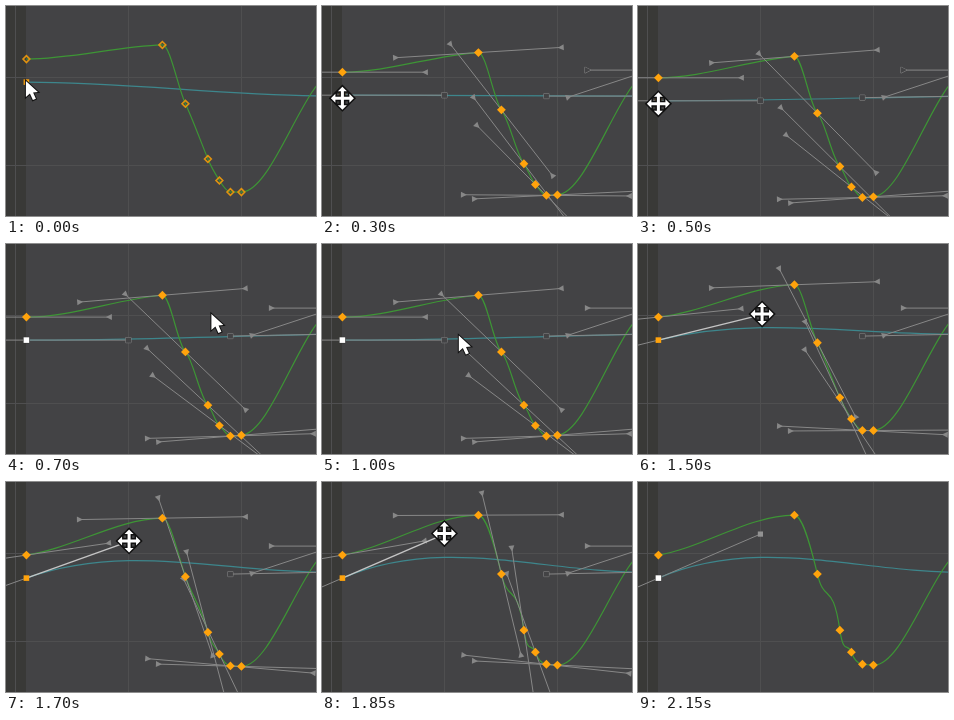
An HTML page with a canvas that plays this animation: 310 px wide and 210 px high, repeating every 2.3 s.

```html
<!DOCTYPE html>
<html lang="en">
<head>
<meta charset="utf-8">
<title>Curve editor</title>
<style>
html, body { margin: 0; width: 100%; height: 100%; overflow: hidden; background: #434345; }
canvas { display: block; }
</style>
</head>
<body>
<canvas id="stage" width="310" height="210"></canvas>
<script>
const ctx = document.getElementById('stage').getContext('2d');
const LOOP = 2300, STEP = 50, ARM = 83, RAD = Math.PI / 180;
const BACK = '#434345', GREEN = '#3d9535', TEAL = '#3d868c', GREY = '#878787';
const ORANGE = '#ffa30c', DIM_ORANGE = '#e0920f';

// green keys: offset from the teal curve, handle angle at rest and its gain with the lift
const KEYS = [
  { x: 20, off: -23, rest: 0, gain: 0 },
  { x: 156, off: -43, rest: -4.8, gain: 4.5 },
  { x: 179, off: 14.2, rest: 43, gain: 33 },
  { x: 201.5, off: 68, rest: 42, gain: 39 },
  { x: 213, off: 88.7, rest: 36, gain: 33.5 },
  { x: 224, off: 99.5, rest: -1.8, gain: 8 },
  { x: 235, off: 99, rest: -4.8, gain: 7.5 }
];
const LAST = { x: 328, y: 64, slope: -27 / 82 };

const mix = (a, b, u) => a + (b - a) * u;
const span = (t, from, to) => Math.min(1, Math.max(0, (t - from) / (to - from)));
const easeOut = u => u * (1.25 - 0.25 * u);

function line(x1, y1, x2, y2, color = GREY, width = 1) {
  ctx.strokeStyle = color;
  ctx.lineWidth = width;
  ctx.beginPath();
  ctx.moveTo(x1, y1);
  ctx.lineTo(x2, y2);
  ctx.stroke();
}

function shape(points, fill, stroke, width = 1) {
  ctx.beginPath();
  points.forEach(p => ctx.lineTo(p[0], p[1]));
  ctx.closePath();
  if (stroke) {
    ctx.strokeStyle = stroke;
    ctx.lineWidth = width;
    ctx.stroke();
  }
  if (fill) {
    ctx.fillStyle = fill;
    ctx.fill();
  }
}

function diamond(x, y, filled) {
  const r = filled ? 4.4 : 3.4;
  shape([[x - r, y], [x, y - r], [x + r, y], [x, y + r]],
    filled && ORANGE, !filled && DIM_ORANGE, 1.6);
}

function square(x, y, r, fill, stroke) {
  shape([[x - r, y - r], [x + r, y - r], [x + r, y + r], [x - r, y + r]], fill, stroke);
}

function arrowhead(x, y, angle, hollow) {
  ctx.save();
  ctx.translate(x, y);
  ctx.rotate(angle);
  shape([[3.5, 0], [-2.5, -3], [-2.5, 3]], hollow ? BACK : GREY, hollow && GREY);
  ctx.restore();
}

function curve(x1, y1, hx1, hy1, hx2, hy2, x2, y2, color) {
  ctx.strokeStyle = color;
  ctx.lineWidth = 1.2;
  ctx.beginPath();
  ctx.moveTo(x1, y1);
  ctx.bezierCurveTo(hx1, hy1, hx2, hy2, x2, y2);
  ctx.stroke();
}

function segment(a, b) {
  const d = (b.x - a.x) / 3;
  curve(a.x, a.y, a.x + d, a.y + d * a.slope, b.x - d, b.y - d * b.slope, b.x, b.y, GREEN);
}

function background() {
  ctx.fillStyle = BACK;
  ctx.fillRect(0, 0, 310, 210);
  ctx.fillStyle = '#393937';
  ctx.fillRect(0, 0, 20, 210);
  ctx.fillStyle = '#4f4f50';
  [9, 122, 235].forEach(x => ctx.fillRect(x, 0, 1, 210));
  [71, 159].forEach(y => ctx.fillRect(0, y, 310, 1));
}

function pointer(x, y) {
  const pts = [[0, 0], [0, 16], [4, 12.5], [7, 19], [10, 17.7], [7.2, 11.5], [12, 11]];
  shape(pts.map(p => [x + p[0], y + p[1]]), '#fff', '#111', 2);
}

function moveCursor(x, y) {
  const arm = [[-1.5, -1.5], [-1.5, -7], [-4.5, -7], [0, -11.5], [4.5, -7], [1.5, -7]];
  const pts = [];
  for (let i = 0; i < 4; i++) {
    const c = Math.cos(i * 90 * RAD), s = Math.sin(i * 90 * RAD);
    arm.forEach(p => pts.push([x + p[0] * c - p[1] * s, y + p[0] * s + p[1] * c]));
  }
  shape(pts, '#fff', '#111', 3);
}

function draw(t) {
  const open = t >= 50 && t < 2150;
  const bent = t >= 1150;

  // the key is dragged down, then its handle up
  const y0 = mix(76, 96, span(t, 0, 550) ** 0.7);
  const pull = easeOut(span(t, 1125, 1850));
  const hx = bent ? mix(126, 122, pull) : 122;
  const hy = y0 - 44 * pull;
  const farY = 90 + Math.max(0, (y0 - 90) / 3);

  const teal = x => {
    const u = (x - 20) / 306, v = 1 - u;
    return y0 * v ** 3 + 3 * hy * v * v * u + 3 * farY * v * u * u + 90 * u ** 3;
  };
  const lift = (94 - teal(179)) / 16;
  const tilt = 0.42 * Math.atan2(hy - y0, hx - 20);
  const keys = KEYS.map(({ x, off, rest, gain }, i) => {
    const angle = i ? (rest + gain * lift) * RAD : tilt;
    return { x, y: teal(x) + off, angle, slope: Math.tan(angle) };
  });

  background();
  ctx.save();
  ctx.translate(0.4, 0.1);

  curve(20, y0, hx, hy, 224, farY, 326, 90, TEAL);
  [...keys, LAST].forEach((k, i, all) => i && segment(all[i - 1], k));

  if (open) {
    keys.forEach(({ x, y, angle }, i) => {
      const dx = ARM * Math.cos(angle), dy = ARM * Math.sin(angle);
      line(x - dx, y - dy, x + dx, y + dy);
      if (i) arrowhead(x - dx, y - dy, angle);
      arrowhead(x + dx, y + dy, angle + Math.PI);
    });
    line(246, 91, LAST.x, LAST.y);
    arrowhead(246, 91, -0.32);
    line(265, 64, 348, 64);
    arrowhead(265, 64, 0, t < 600);
    line(224, farY, 326, 90);
    square(224, farY, 2.5, BACK, GREY);
  }

  if (open || bent) {
    const active = open && bent;
    line(40 - hx, 2 * y0 - hy, 20, y0);
    line(20, y0, hx, hy, active ? '#c4c4c4' : GREY, active ? 1.4 : 1);
    square(hx, hy, 2.6, open ? BACK : '#929292', open && GREY);
  }

  keys.forEach(k => diamond(k.x, k.y, t >= 50));
  const white = (t >= 600 && !bent) || t >= 2150;
  square(20, y0, 2.8, white ? '#fff' : ORANGE, white && '#333');

  if (t < 50) pointer(19.5, 75);
  else if (t < 600) moveCursor(20, y0 + 3);
  else if (!bent) {
    const out = span(t, 550, 700), back = span(t, 700, 1050);
    pointer(mix(mix(20, 205, out), 125, back), mix(mix(98, 70, out), 95, back));
  } else if (open) moveCursor(hx, hy - 0.5);
  ctx.restore();
}

const start = performance.now();
function tick() {
  const t = (performance.now() - start) % LOOP;
  draw(Math.floor(t / STEP) * STEP);
  requestAnimationFrame(tick);
}
tick();
</script>
</body>
</html>
```
